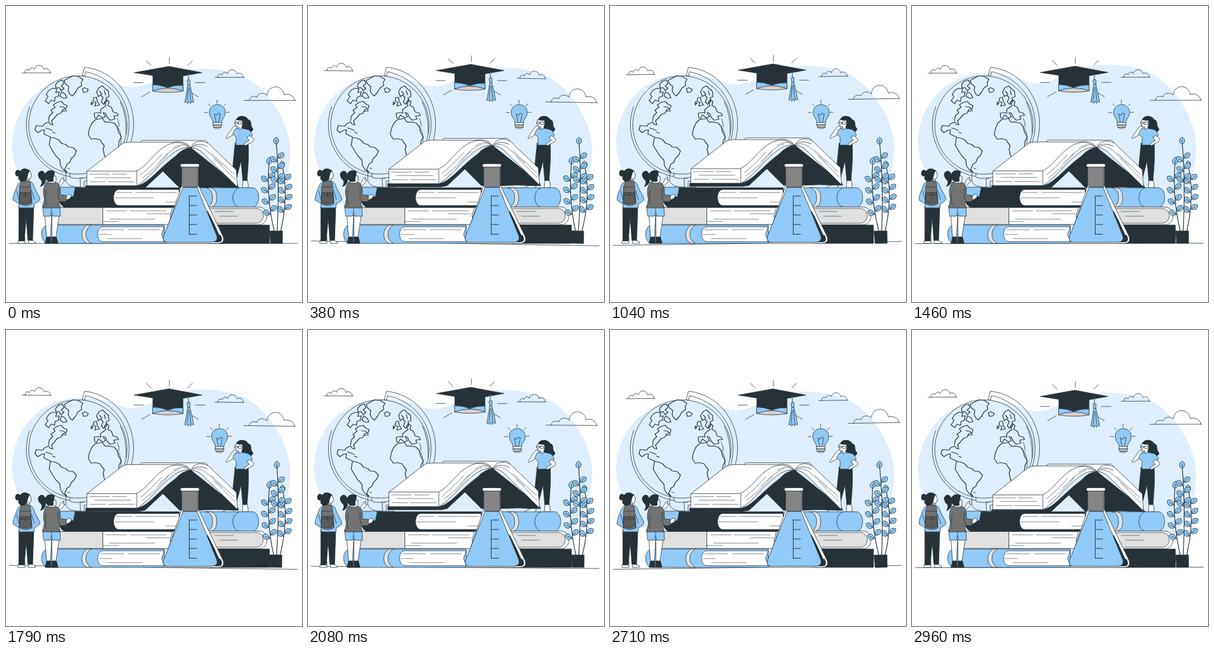
An HTML page for the animation above (3000 ms loop, 500 px wide and 500 px high).

```html
<!DOCTYPE html>
<html lang="en">
<head>
<meta charset="utf-8">
<title>Learning</title>
<style>
html, body { margin: 0; height: 100%; overflow: hidden; background: #fff; }
svg { display: block; width: 100vw; height: 100vh; }
svg { fill: none; stroke: #263238; stroke-width: .8; stroke-linecap: round; stroke-linejoin: round; }
.dark { fill: #263238; }
.blue { fill: #90caf9; }
.pale { fill: #deeefd; }
.grey { fill: #e0e0e0; }
.mid { fill: #737373; }
.white { fill: #fff; }
.bare { stroke: none; }
.thin { stroke-width: .6; }
.coast { stroke-width: 1.25; }
</style>
</head>
<body>
<svg viewBox="0 0 500 500">
  <path id="blob" class="pale bare" d="M10 238C11 190 35 154 68 135C103 113 158 118 190 133C222 147 249 124 283 113C318 102 362 104 396 117C438 132 480 195 480 243C480 300 455 352 400 380H110C85 360 14 310 10 238Z"/>
  <path id="ground" d="M5.500 401H492"/>

  <g id="clouds">
    <path id="cloud" d="M32 113C31 107 37 106 39 109C40 104 46 103 48 107C50 98 62 98 64 107C69 104 74 107 75 113M27 113H76"/>
    <use href="#cloud" x="326" y="7.500"/>
    <path d="M411 159.500C411 153 419 151 424 154C425 147 436 145 441 151C443 132 467 132 470 150C478 147 487 152 488 159.500M402 159.500H489.500"/>
  </g>

  <!-- Globe -->
  <path d="M133 103.500C180 108 215 150 215.500 198C216 250 180 292 132 296L132 306H145V310H118V306H126L125 291C175 287 208 248 208 199C207 154 176 119 134 111L133 118H129Z"/>
  <path d="M131 306C113 307 102 303 101 294V281H108V289C115 293 126 290 131 291"/>
  <path d="M40 170A88 88 0 0 0 107 288"/>
  <circle class="pale" cx="121.500" cy="201" r="83"/>
  <path d="M193 162Q204 184 203 216"/>
  <path class="coast" d="M107 121L113 118L122 119L130 124L127 129L128 134L121 139L118 145L112 152L108 149L105 143L106 136L101 132L98 126ZM84 132L89 127L95 125L98 131L93 135L98 139L93 143L90 138L84 138ZM79 139L73 142L68 149L71 153L66 160L72 165L76 159L82 161L83 154L88 153L90 145L84 146L86 140ZM94 145L100 149L103 155L97 156L91 152ZM129 140L133 138L139 141L137 145L131 146Z
    M86 163L93 161L98 166L103 168L102 173L96 175L93 181L87 183L81 190L77 194L79 201L75 200L72 196L65 199L62 203L51 202L49 209L54 214L60 210L65 209L64 216L70 219L75 221M86 163L80 167L83 171L76 176L79 180L73 186L72 194M91 170L98 171L102 177L94 178M67 206L73 208L78 210M79 213L83 215
    M75 222L82 223L89 226L94 232L101 234L105 238L113 239L119 245L116 252L110 258L108 264L103 267L101 272L99 276L103 281L97 277L92 270L91 260L84 253L79 245L73 235Z
    M145 198L151 192L163 190L167 196L175 196L183 198L188 204L190 213L195 221L191 228L190 238L184 243L181 252L175 259L169 259L166 251L164 242L166 236L162 231L159 226L151 224L144 225L139 217L141 207Z
    M150 189L149 181L156 180L160 181L160 175L165 171L169 168L166 163L170 158L174 162L172 168L178 171L181 179L188 181L190 185L182 186L184 191L176 193L171 188L168 181L164 180L168 187L163 189L156 184L153 190ZM153 145L157 138L163 135L167 139L173 144L174 153L169 155L170 162L165 166L161 162L164 155L160 150L156 153ZM148 155L153 154L154 161L158 167L150 169L152 163L147 161ZM144 162L147 164L144 167ZM158 144L162 149M166 143L168 150"/>
  <path d="M188 204Q196 211 194 236M188 190Q192 197 191 204M104 274L108 275"/>

  <g id="cap">
    <path d="M276 87.500V97.500M237 92.500L245 100.500M315 92.500L307 100.500M216 129.500H232M320 129.500H336M229 153.500L243 145.500M325 153.500L313 146.500"/>
    <path class="dark" d="M248 114V143H299V114Z"/>
    <path fill="#d6d0d0" d="M248 143Q273 133 299 143V144Q273 148 248 144Z"/>
    <path class="blue" d="M248 133Q261 133 273 138Q286 133 299 134V143.500Q273 134 248 143.500Z"/>
    <path class="dark" d="M217 112.500L275 102L331 112.500L277 122Z"/>
    <path stroke="#90caf9" d="M308 115V126"/>
    <path class="blue" d="M306 126Q309 122 311 126L310.500 133Q315 149 317 163L313 161L312 165L309 161L307 165L305 162L302 163Q305 148 307 133Z"/>
    <path d="M307 133H311M308 138L306 160M310 138L312 160M308 115V126"/>
  </g>

  <g id="bulb">
    <path d="M335 180H340.500M372 179.500H377M356.500 159V164.500M341.500 165L345 168.500M372 165L368.500 168.500"/>
    <path class="blue" d="M350 198C350 191 343.500 188 343.500 180C343.500 162 370.500 162 370.500 180C370.500 188 364 191 364 198Z"/>
    <path class="white" d="M350 197H364V204L361 207H353L350 204Z"/>
    <path d="M355 197L352 182L356 185L358 181L362 182L359 197"/>
    <path stroke-width="1.500" d="M350 201H364M351 204.500H363"/>
  </g>

  <!-- Thinker -->
  <path class="white" d="M400 292L400 299L399 307H409L409 301L407 292ZM383 293L376 302L367 306V308H384L387 296Z"/>
  <path class="dark" d="M387 232H409Q411 252 407 295H400L397 262L388 296H381Q384 260 387 232Z"/>
  <path class="dark" d="M389 193C390 184 405 184 409 192C417 194 411 201 417 207C418 216 404 212 399 209L393 203Z"/>
  <path class="white" d="M389 208L383 218L374 223Q371 225 372 221L381 208L386 202L390 205Z"/>
  <path class="blue" d="M387 208L395 206L406 208Q414 209 416 219L411 223L409 235H388L389 222L383 216Z"/>
  <path class="white" d="M412 219L418 224Q420 227 417 229L404 236L402 233L411 227L407 222Z"/>
  <path class="white" d="M389 192Q394 194 399 193L400 198L398 207L394 209L393 204Q388 205 388 200L386 198Z"/>
  <path d="M387 196H391V199H387ZM393 196H398V200H393ZM391 197H393"/>

  <g id="book">
    <path class="white" d="M227 230L229 227H337L341 231L312 240Z"/>
    <path class="dark" d="M135 303.500H221C240 301 256 276 286 254Q300 239 313 240L391 302L393 307H381L354 306L325 307H293L265 279L235 307L224 309H135Z"/>
    <path class="white" d="M137 279L196 233Q200 230 208 230H282Q303 226 312 239.500C292 236 276 253 258 270Q239 292 222 303.500H137Z"/>
    <path class="white" d="M312 239.500Q318 226 334 229Q343 231 350 240L389 277L391 306L333 249Q323 239 312 239.500Z"/>
    <path d="M137 279H221V303M221 278.500C239 271 250 246 274 234Q294 225 312 239.500M312 239.500Q321 229 340 237"/>
    <path class="thin" d="M141 284H175M180 284H204M150 290H211M142 297H168M173 297H217M227 286Q248 268 263 251M230 291Q258 270 274 249M255 267Q279 241 294 237M282 240Q298 230 309 238M316 238Q327 233 341 246L366 269M346 248L385 284M352 258L387 293"/>
  </g>

  <!-- Stacked books -->
  <path class="dark" d="M98 307H293V340H98Q89 334 89 324Q89 312 98 307Z"/>
  <path class="white" d="M292 310H190C179 311 179 336 190 337H292Z"/>
  <path class="blue" d="M326 307H417C430 309 430 338 417 340H326Z"/>
  <path class="grey" d="M338 307H346Q356 309 356 324Q356 338 346 340H338Q349 338 349 324Q349 309 338 307Z"/>
  <path d="M394 307Q384 310 383 324Q384 338 394 340"/>
  <path class="grey" d="M84 340.500H164V369H84Q91 355 84 340.500Z"/>
  <path class="white" d="M164 340.500H281L277 355L281 369H164Z"/>
  <path class="white" d="M340 339.500H428C445 341 445 368 428 369.500H340Z"/>
  <path class="grey" d="M340 342H424C438 344 438 365 424 367H340Z"/>
  <path class="blue" d="M267 370H70C57 372 57 399 70 401H267Z"/>
  <path class="grey" d="M144 370H137Q128 376 128 386Q128 397 137 401H144Q135 396 135 386Q135 375 144 370Z"/>
  <path class="white" d="M267 373H163C152 374 152 397 163 398H267L263 386Z"/>
  <path class="dark" d="M345 370H445V401H345Z"/>
  <path class="thin" d="M187 315H213M219 315H288M184 324H249M270 331H290M170 346H204M210 346H271M237 351H276M175 360H251M164 364H190M160 378H199M206 378H259M157 386H178M171 393H230M353 347H384M361 355H391"/>

  <!-- Flask -->
  <path class="white" d="M297 272V303L267 390Q265 401 274 401H359Q370 400 367 390L325 303V272Z"/>
  <path class="dark bare" d="M340 345L364 390Q367 399 358 399H340Z"/>
  <path class="blue" d="M299 307L266 389Q264 399 273 399H348Q359 398 356 388L323 307Z"/>
  <path fill="#858585" d="M298.500 272H324V306H298.500Z"/>
  <path stroke="#fff" stroke-width="1.800" d="M327 312L361 386"/>
  <rect class="white" x="294.500" y="266.500" width="32" height="5.500" rx="2.500"/>
  <path stroke-width="1" d="M309.500 321V386M309.500 321H322M309.500 337H322M309.500 353H322M309.500 369H322M309.500 385.500H322"/>

  <g id="plant"><path class="dark" d="M445 380H467V401H447Z"/></g>

  <!-- Student with backpack -->
  <path class="white" d="M23 391L20 399V401H32V391ZM38 391V401H50V399L44 396L43 391Z"/>
  <path class="dark" d="M22 338H47L45 396H37L34 358L31 397H22Z"/>
  <path class="white" d="M30 290H39V299H29Z"/>
  <path class="blue" d="M26 296L38 295Q46 297 48 307L57 324Q58 330 48 334L47 341H22V334L12 328Q11 322 17 309Q20 298 26 296Z"/>
  <path class="white" d="M30 279H41L43 286L41 292Q36 294 31 290Z"/>
  <path class="dark" d="M24 279Q30 271 40 278Q37 282 36 288Q36 297 25 296Q19 292 22 287Q15 289 16 281Q18 274 24 279Z"/>
  <path class="mid" d="M26 297Q35 293 41 298L44 334Q34 340 22 334L23 305Z"/>
  <path fill="#5c5c5c" d="M24 315H42L43 331Q33 336 23 332Z"/>
  <path d="M24 306H42M30 296Q33 290 36 296M33 315V322M43 311L48 327M18 312L22 327M25 319H41"/>

  <!-- Student with laptop -->
  <path class="white" d="M66 353H77L75 393H69ZM78 353H90L84 393H78Z"/>
  <path class="dark" d="M69 390H76V401H66ZM78 390H85L88 401H77Z"/>
  <path class="white" d="M89 300L94 291L98 289L96 294L100 294L96 299L91 304Z"/>
  <path class="blue" d="M62 337H91L92 355H79L77 348L75 355H64Z"/>
  <path class="blue" d="M92 306H117L114 322H92Z"/>
  <path class="white" d="M96 325L106 318L111 320L108 325L99 329Z"/>
  <path class="mid" d="M68 298Q79 295 87 299L91 306L92 319L102 320V330L89 331L91 341H62L65 326Q60 310 68 298Z"/>
  <path class="white" d="M70 287H84L85 294L82 299H72Z"/>
  <path class="dark" d="M66 284Q72 274 82 280L81 286Q79 289 80 296Q70 299 67 291Q68 302 58 305Q64 296 57 292Q51 282 59 279Q64 278 66 284Z"/>
  <path d="M88 308V324L92 330M68 311Q65 324 68 336M77 341V348"/>
</svg>
<script>
const NS = 'http://www.w3.org/2000/svg';
const el = id => document.getElementById(id);
const add = (parent, attrs) => {
  const path = parent.appendChild(document.createElementNS(NS, 'path'));
  for (const key in attrs) path.setAttribute(key, attrs[key]);
  return path;
};

// Leaves grow in pairs along each stem and end in one at the tip.
function grow(d, pairs, start) {
  const stem = add(el('plant'), { d, 'stroke-width': 1.2 });
  const length = stem.getTotalLength();
  const leaf = (at, turn) => {
    const p = stem.getPointAtLength(at), q = stem.getPointAtLength(at - 1);
    const angle = Math.atan2(p.y - q.y, p.x - q.x) * 180 / Math.PI + turn;
    add(el('plant'), {
      class: 'blue',
      d: 'M0 0L2 0Q4-5 9-4.500Q13-3 14.500 0Q13 4 9 4.500Q4 4 2 0H10',
      transform: `translate(${p.x} ${p.y}) rotate(${angle})`
    });
  };
  for (let i = 0; i < pairs; i++) {
    const at = length * (start + (.93 - start) * i / pairs);
    leaf(at, -55);
    leaf(at + 5, 50);
  }
  leaf(length, 0);
}
grow('M464 380Q477 325 468 276', 4, .3);
grow('M453 380Q440 325 444 270', 4, .25);
grow('M458 380Q462 300 457 236', 3, .57);

// Linear interpolation between [progress, value] stops.
function tween(stops, p) {
  const i = stops.findIndex(s => s[0] >= p) || 1;
  const [a, x] = stops[i - 1], [b, y] = stops[i];
  return x + (y - x) * (p - a) / (b - a);
}
const float = [[0, 0], [.5, -6.8], [1, 0]];
const wind = [[0, 0], [.25, 1], [.75, -1], [1, 0]];
const shake = [[0, 0], [.1, -1], [.2, 2], [.3, -4], [.4, 4], [.5, -4],
  [.6, 4], [.7, -4], [.8, 2], [.9, -1], [1, 0]];
const move = (id, x, y) => el(id).setAttribute('transform', `translate(${x} ${y})`);
const turn = (id, angle, x, y) => el(id).setAttribute('transform', `rotate(${angle} ${x} ${y})`);

const begin = performance.now();
function draw(now) {
  const t = Math.max(0, now - begin);
  const slow = t % 3000 / 3000, fast = t % 1500 / 1500;
  const lift = tween(float, fast), sway = tween(wind, fast);
  move('blob', 0, tween(float, slow));
  move('cap', 0, lift);
  move('book', 0, lift);
  move('bulb', tween(shake, slow), 0);
  turn('clouds', sway, 258, 130);
  turn('ground', sway, 249, 401);
  turn('plant', sway, 458, 311);
  requestAnimationFrame(draw);
}
draw(begin);
</script>
</body>
</html>
```
